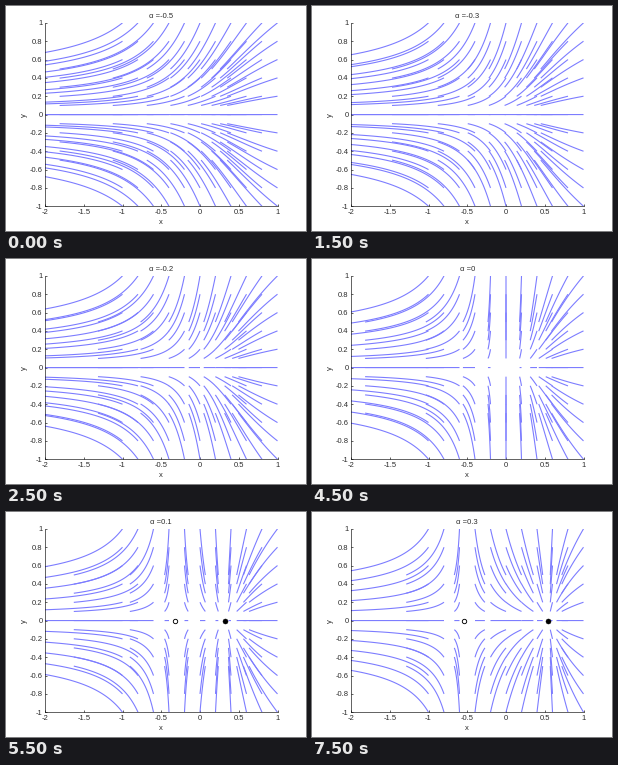
A matplotlib script that plays this animation: 300 by 225 pixels, repeating every 8 s.

```python
import numpy as np
import matplotlib.pyplot as plt
from matplotlib.animation import FuncAnimation
from matplotlib.collections import LineCollection

W, H, DPI = 300, 225, 100
PX = 72 / DPI  # points per pixel
SPAN = 0.7     # time each trajectory is followed
INK, BLUE = "#2c2c2c", "#7c7cff"

plt.rcParams["font.family"] = "Liberation Sans"
plt.rcParams["font.size"] = 7.6 * PX
plt.rcParams["text.color"] = INK

fig = plt.figure(figsize=(W / DPI, H / DPI), dpi=DPI, facecolor="white")
ax = fig.add_axes([0.13, 0.11, 0.775, 0.815])
ax.set(xlim=(-2, 1), ylim=(-1, 1))
ax.spines[["top", "right"]].set_visible(False)
ax.spines[["left", "bottom"]].set_linewidth(0.6 * PX)

xticks = np.arange(-4, 3) / 2
yticks = np.arange(-5, 6) / 5
ax.set_xticks(xticks, [f"{v:g}" for v in xticks])
ax.set_yticks(yticks, [f"{v:g}" for v in yticks])
ax.tick_params(direction="in", length=2.3 * PX, width=0.6 * PX,
               pad=2.6 * PX, labelcolor=INK)


def label(x, y, text, **style):
    return fig.text(x / W, 1 - y / H, text, ha="center", **style)


label(155.3, 218, "x", va="baseline")
label(18, 109, "y", va="center", rotation=90)
title = label(155.3, 12.3, "", va="baseline")

x0, y0 = np.meshgrid(np.arange(-5, 6) / 5, np.arange(-5, 6) / 5)
x0, y0 = x0.reshape(-1, 1), y0.reshape(-1, 1)
t = np.linspace(0, SPAN, 50)

# Opaque pale strokes, unsnapped, so that overlapping ones stay pale.
curves = LineCollection([], colors=BLUE, linewidths=1.1 * PX, snap=False)
ax.add_collection(curves, autolim=False)

dot = dict(ls="", marker="o", mec="black", zorder=4)
saddle, = ax.plot([], [], mfc="none", ms=4.4 * PX, mew=0.9 * PX, **dot)
node, = ax.plot([], [], mfc="black", ms=5 * PX, mew=0.5 * PX, **dot)


def flow(a):
    """Exact solution of x' = a - x^2, y' = -y from every start point."""
    s = np.sqrt(abs(a))
    if a > 0:
        q = np.tanh(s * t) / s
    elif a < 0:
        q = np.tan(s * t) / s
    else:
        q = t
    x = (x0 + a * q) / (1 + x0 * q)
    return np.stack([x, y0 * np.exp(-t)], axis=-1)


def draw(i):
    a = ((i + 1) // 2 - 5) / 10
    curves.set_segments(flow(a))
    title.set_text(f"α ={a:g}")
    root = [np.sqrt(a)] if a > 0 else []
    node.set_data(root, [0] * len(root))
    saddle.set_data([-r for r in root], [0] * len(root))
    return curves, title, node, saddle


anim = FuncAnimation(fig, draw, frames=16, interval=500, repeat=True)
plt.show()
```
